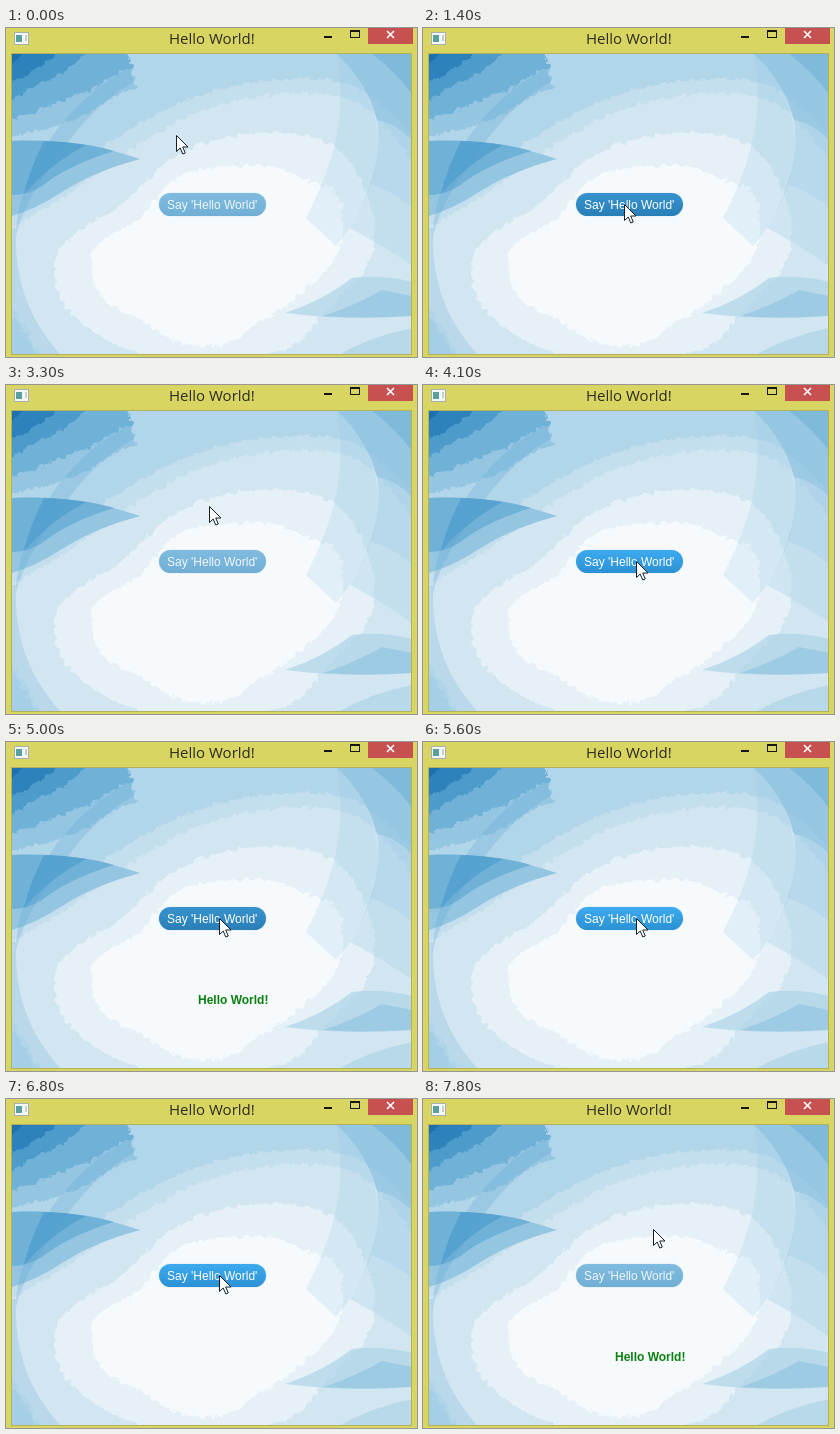
An HTML page for the animation above (7900 ms loop, 411 px wide and 329 px high).

```html
<!DOCTYPE html>
<html lang="en">
<head>
<meta charset="utf-8">
<title>Hello World!</title>
<style>
html, body { margin: 0; width: 100%; height: 100%; overflow: hidden; background: #d9d562; }
svg { display: block; width: 411px; height: 329px; }
.title { font: 15px "Open Sans", sans-serif; fill: #2c2c22; }
.label { font: 12px "Liberation Sans", Arial, sans-serif; }
.greeting { font: bold 12px "Liberation Sans", Arial, sans-serif; fill: #0a800f; }
</style>
</head>
<body>
<svg viewBox="0 0 411 329">
  <defs>
    <clipPath id="content"><rect x="6" y="26" width="399" height="300"/></clipPath>
    <filter id="rough" filterUnits="userSpaceOnUse" x="0" y="20" width="411" height="309">
      <feTurbulence type="fractalNoise" baseFrequency=".16" numOctaves="3" seed="4"/>
      <feDisplacementMap in="SourceGraphic" scale="9" xChannelSelector="R" yChannelSelector="G"/>
    </filter>
    <linearGradient id="shade" x2="0" y2="1">
      <stop id="shadeTop"/><stop id="shadeBottom" offset="1"/>
    </linearGradient>
  </defs>

  <rect width="411" height="329" fill="#d9d562"/>
  <rect x="5.5" y="25.5" width="400" height="301" fill="none" stroke="#b3b25c"/>

  <g clip-path="url(#content)">
    <rect x="6" y="26" width="400" height="300" fill="#b1d5e9"/>
    <!-- tonal bands, dark corner to bright centre -->
    <g filter="url(#rough)">
      <path fill="#c3deed" d="M-5 182C40 160 70 136 106 113C146 87 184 66 232 57C278 48 330 47 355 62C380 75 398 100 420 120V340H36C26 314 14 296 -5 276Z"/>
      <path fill="#d2e6f1" d="M-5 206C30 186 66 164 104 137C140 110 172 87 222 75C264 64 320 60 345 72C376 85 392 116 420 150V340H40C30 314 18 296 -5 262Z"/>
      <path fill="#e5f1f7" d="M48 240C50 212 76 202 104 184C134 165 146 140 181 122C217 106 253 102 291 106C330 110 348 133 358 160C374 194 372 228 352 250C332 272 318 282 303 304C287 327 244 330 190 330C144 331 108 321 82 300C58 282 47 265 48 240Z"/>
      <path fill="#f6fafd" d="M85 228C87 209 112 207 132 191C153 176 151 158 180 145C205 137 228 141 246 137C274 136 290 151 314 156C332 160 338 177 337 195C338 219 326 240 310 253C292 266 283 279 263 289C240 299 233 317 207 318C182 320 157 310 142 296C121 282 93 278 88 254Z"/>
      <path fill="#94c6e2" d="M0 20H122Q125 42 130 60C105 67 91 83 70 91C45 101 25 104 0 110Z"/>
      <path fill="#70b1d8" d="M0 20H121L126 38C104 49 91 60 72 66C43 79 24 85 0 93Z"/>
      <path fill="#4d9bcb" d="M0 20H82C70 37 53 47 36 55L0 74Z"/>
      <path fill="#2e82bb" d="M0 20H54C42 37 24 46 0 58Z"/>
      <path fill="#1b6fae" d="M0 20H27L0 40Z"/>
    </g>
    <!-- crossing arcs -->
    <path fill="#94c6e2" d="M6 113C58 111 100 119 134 131C104 139 78 150 56 164Q30 181 6 188Z"/>
    <path fill="#70b1d8" d="M6 113C48 111 84 116 108 123C78 132 52 145 36 158Q22 167 6 167Z"/>
    <path fill="#57a3d0" d="M38 113Q62 114 80 117Q44 136 18 166Q24 140 38 113Z"/>
    <path fill="#4d9bcb" opacity=".22" d="M124 40C82 60 48 100 29 136C18 158 10 184 9 214C14 186 31 156 51 130C72 98 100 68 128 54Z"/>
    <path fill="#94c6e2" opacity=".4" d="M6 200H10C8 254 24 292 54 326H6Z"/>
    <path fill="#94c6e2" opacity=".22" d="M331 26C364 57 376 96 371 134C366 166 350 194 330 218L300 190C326 140 342 90 331 26Z"/>
    <path fill="#85bedf" opacity=".62" d="M331 26H406V112Q390 96 371 92Q361 54 331 26Z"/>
    <path fill="#65a9d3" opacity=".45" d="M366 26H406V66Q390 44 366 26Z"/>
    <path fill="#94c6e2" opacity=".42" d="M371 92Q390 96 406 112V180Q388 164 364 156Q376 126 371 92Z"/>
    <path fill="#a6d0e7" opacity=".35" d="M364 156Q388 164 406 180V238Q378 218 344 200Q357 180 364 156Z"/>
    <path fill="#a6d0e7" opacity=".6" d="M279 285Q318 272 346 250Q376 246 406 254V288Q340 293 279 285Z"/>
    <path fill="#85bedf" opacity=".5" d="M318 288Q352 276 376 262L406 268V288Q360 291 318 288Z"/>
    <path fill="#a6d0e7" opacity=".6" d="M334 326Q366 308 406 300V326Z"/>
  </g>

  <!-- window chrome -->
  <rect x="8.5" y="4.5" width="14" height="12" fill="#f5f7f7" stroke="#a9b1b0"/>
  <rect x="10" y="7" width="6" height="7" fill="#5a9fa0"/>
  <path d="M19 8h2M19 10h2M19 12h2" stroke="#9ba6aa"/>
  <text class="title" x="163" y="16">Hello World!</text>
  <rect x="318" y="8" width="8" height="2" fill="#161616"/>
  <path d="M344 2h10v8h-10zM345 4v5h8V4z" fill="#161616" fill-rule="evenodd"/>
  <rect x="362" width="45" height="16" fill="#c75050"/>
  <path d="M381 3l7 7M388 3l-7 7" stroke="#fff" stroke-width="1.6"/>

  <rect x="152.5" y="164.5" width="108" height="24" rx="12" fill="#dcebf4"/>
  <rect x="153" y="165" width="107" height="23" rx="11.5" fill="url(#shade)"/>
  <text id="label" class="label" x="161" y="181">Say 'Hello World'</text>
  <text id="greeting" class="greeting" x="192" y="262">Hello World!</text>
  <path id="cursor" d="M.5 .5V16.5L4.2 13L6.8 19L9.3 18L6.7 12H12Z" fill="#fff" stroke="#17202a"/>
</svg>
<script>
const LOOP = 7900, STEP = 100;
const $ = id => document.getElementById(id);

// time, x, y of the pointer tip
const route = [
  [0, 170, 107], [400, 176, 124], [900, 201, 176], [2500, 201, 176],
  [3000, 203, 128], [3300, 203, 121], [3600, 205, 132], [4100, 213, 176],
  [7200, 213, 176], [7600, 227, 137], [7800, 230, 130]
];
const presses = [[1300, 1600], [2100, 2300], [4400, 4600], [4900, 5200], [6900, 7100]];
// gradient top, gradient bottom, text
const looks = {
  idle: ['#80bbdf', '#70afd5', '#f0f7fb'],
  hover: ['#3daaf0', '#2b91d3', '#fff'],
  pressed: ['#3793cd', '#297fb8', '#fff']
};

function pointerAt(t) {
  const next = route.findIndex(key => key[0] > t);
  if (next < 0) return route[route.length - 1].slice(1);
  const [t0, x0, y0] = route[next - 1], [t1, x1, y1] = route[next];
  const u = (t - t0) / (t1 - t0), ease = u * u * (3 - 2 * u);
  return [x0 + (x1 - x0) * ease, y0 + (y1 - y0) * ease].map(Math.round);
}

function draw(time) {
  const t = Math.floor(time % LOOP / STEP) * STEP;
  const [x, y] = pointerAt(t);
  const inside = x >= 153 && x < 260 && y >= 165 && y < 188;
  const pressed = presses.some(([down, up]) => t >= down && t < up);
  const [top, bottom, text] = looks[pressed ? 'pressed' : inside ? 'hover' : 'idle'];
  const clicks = presses.filter(press => t >= press[1]).length;

  $('shadeTop').setAttribute('stop-color', top);
  $('shadeBottom').setAttribute('stop-color', bottom);
  $('label').setAttribute('fill', text);
  $('greeting').setAttribute('visibility', clicks % 2 ? 'visible' : 'hidden');
  $('cursor').setAttribute('transform', `translate(${x} ${y})`);
}

const start = performance.now();
function tick() {
  draw(performance.now() - start);
  requestAnimationFrame(tick);
}
tick();
</script>
</body>
</html>
```
